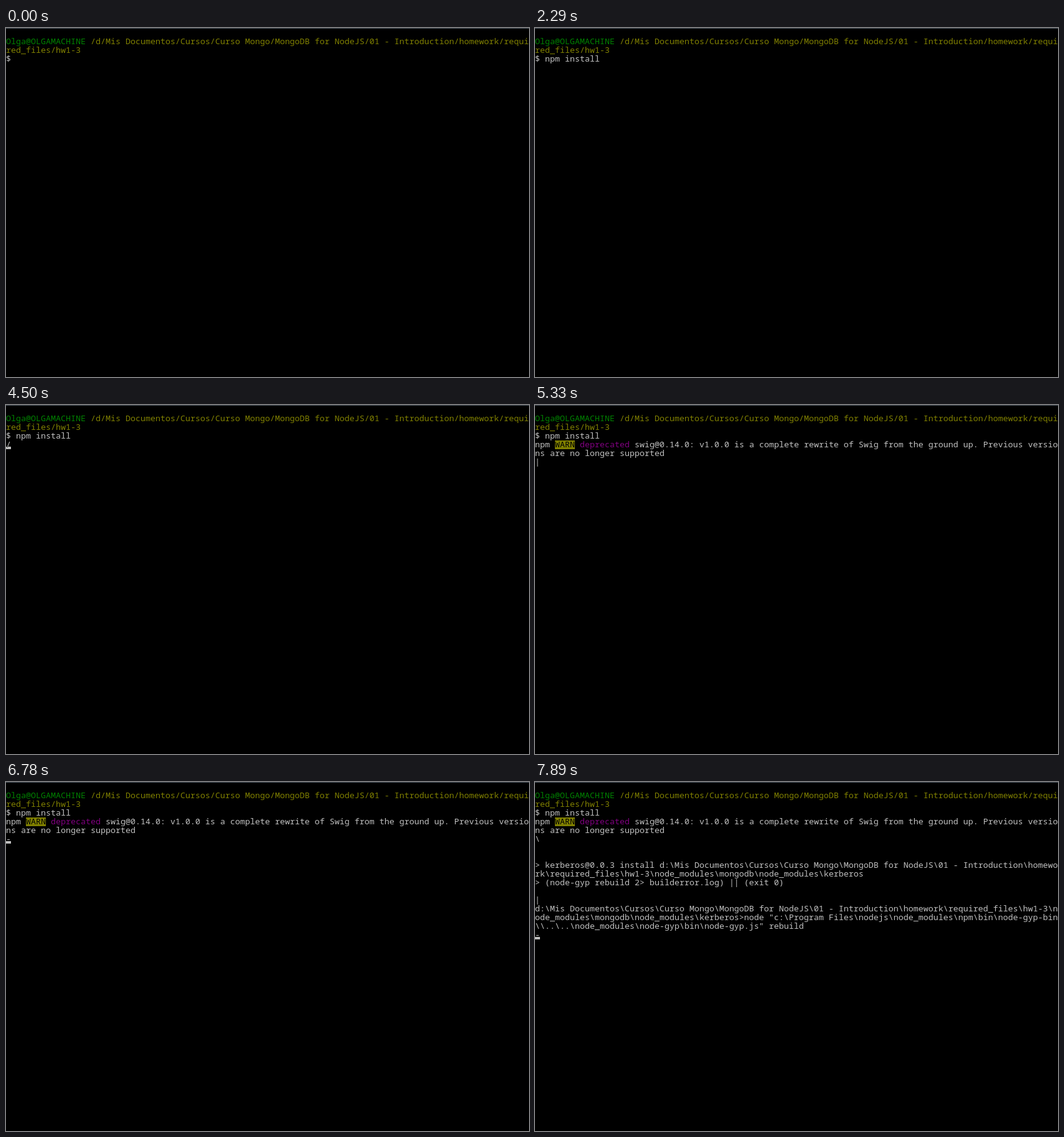
Write an HTML page that moves like this. It is 840 by 561 pixels and loops after 8000 ms.

```html
<!DOCTYPE html>
<html lang="en">
<head>
<meta charset="utf-8">
<title>Terminal</title>
<style>
  html, body { margin: 0; width: 100%; height: 100%; overflow: hidden; background: #000; }
  #screen {
    position: relative; width: 840px; height: 561px; overflow: hidden; background: #000;
    color: #c0c0c0; font: 13.3333px/14px "Noto Sans Mono", "DejaVu Sans Mono", monospace;
    font-variant-ligatures: none; isolation: isolate;
  }
  #edge { position: absolute; left: 0; top: 0; width: 840px; height: 1px; background: #46505a; }
  .run { position: absolute; white-space: pre; height: 14px; }
  #badge { position: absolute; left: 32px; top: 57px; width: 32px; height: 14px; background: #808000; }
  #cursor { position: absolute; width: 8px; height: 4px; background: #c0c0c0; mix-blend-mode: difference; }
</style>
</head>
<body>
<div id="screen"><div id="edge"></div></div>
<script>
const LOOP = 8000, COLS = 105, CW = 8, RH = 14;
const GREEN = '#008000', OLIVE = '#808000', PURPLE = '#800080', GRAY = '#c0c0c0';
const screen = document.getElementById('screen');

function add(parent, id) {
  const el = document.createElement('div');
  if (id) el.id = id;
  return parent.appendChild(el);
}

// Places text on the character grid, wrapping at the last column.
function print(parent, row, col, text, color = GRAY) {
  while (text) {
    const el = add(parent);
    el.className = 'run';
    el.style.cssText = `left:${col * CW}px;top:${row * RH}px;color:${color}`;
    el.textContent = text.slice(0, COLS - col);
    text = text.slice(COLS - col);
    row++;
    col = 0;
  }
}

const user = 'Olga@OLGAMACHINE';
const path = String.raw`d:\Mis Documentos\Cursos\Curso Mongo\MongoDB for NodeJS\01 - Introduction\homework\required_files\hw1-3`;
const module = String.raw`\node_modules\mongodb\node_modules\kerberos`;

print(screen, 1, 0, user, GREEN);
print(screen, 1, user.length + 1, '/' + path.replace(':', '').replaceAll('\\', '/'), OLIVE);
print(screen, 3, 0, '$');

// Output blocks, each visible from its stage onwards.
const warn = add(screen);
add(warn, 'badge');
print(warn, 4, 0, 'npm');
print(warn, 4, 4, 'WARN', '#000');
print(warn, 4, 9, 'deprecated', PURPLE);
print(warn, 4, 20, 'swig@0.14.0: v1.0.0 is a complete rewrite of Swig from the ground up. Previous versions are no longer supported');

const install = add(screen);
print(install, 6, 0, '\\');
print(install, 9, 0, '> kerberos@0.0.3 install ' + path + module);
print(install, 11, 0, '> (node-gyp rebuild 2> builderror.log) || (exit 0)');

const rebuild = add(screen);
print(rebuild, 13, 0, '|');
print(rebuild, 14, 0, path + module + String.raw`>node "c:\Program Files\nodejs\node_modules\npm\bin\node-gyp-bin\\..\..\node_modules\node-gyp\bin\node-gyp.js" rebuild`);

const blocks = [[warn, 2], [install, 3], [rebuild, 4]];
const spinRow = [3, 4, 6, 13, 17];

const typed = add(screen);
const spin = add(screen);
typed.className = spin.className = 'run';
typed.style.left = 2 * CW + 'px';
typed.style.top = 3 * RH + 'px';
const cursor = add(screen, 'cursor');

// time, stage, typed command or spinner glyph, cursor shown
const steps = [
  [0, 0, '', 0], [120, 0, '', 1], [370, 0, 'n', 1], [470, 0, 'np', 1], [710, 0, 'npm', 0],
  [1090, 0, 'npm ', 1], [1210, 0, 'npm i', 1], [1320, 0, 'npm in', 1], [1450, 0, 'npm ins', 1],
  [1680, 0, 'npm inst', 0], [1800, 0, 'npm insta', 1], [1930, 0, 'npm instal', 1],
  [2050, 0, 'npm install', 1], [2170, 1, '', 1], [2290, 1, '', 0], [2770, 1, '', 1], [3280, 1, '', 0],
  [3770, 1, '\\', 1], [3890, 1, '|', 1], [4010, 1, '/', 1], [4140, 1, '-', 1], [4260, 1, '\\', 1],
  [4380, 1, '|', 1], [4500, 1, '/', 1], [4610, 1, '-', 1], [4730, 1, '\\', 1],
  [4850, 2, '', 1], [4960, 2, '|', 1], [5330, 2, '|', 0], [5580, 2, '/', 1], [5700, 2, '-', 1],
  [5820, 2, '-', 0], [5950, 2, '\\', 1], [6070, 2, '|', 1], [6190, 2, '/', 1], [6310, 2, '-', 1],
  [6420, 2, '\\', 1], [6540, 2, '|', 1], [6660, 2, '/', 1], [6780, 2, '-', 1],
  [6910, 3, '', 1], [7040, 4, '/', 1], [7400, 4, '/', 0], [7890, 4, '-', 1]
];

let last;
function render(t) {
  const step = steps.findLast(s => s[0] <= t);
  if (step === last) return;
  last = step;
  const [, stage, text, on] = step;
  const row = spinRow[stage];
  typed.textContent = stage ? 'npm install' : text;
  spin.textContent = stage ? text : '';
  spin.style.top = row * RH + 'px';
  for (const [el, from] of blocks) el.style.display = stage >= from ? '' : 'none';
  cursor.style.left = (stage ? 0 : 2 + text.length) * CW + 'px';
  cursor.style.top = row * RH + 11 + 'px';
  cursor.style.visibility = on ? 'visible' : 'hidden';
}

const start = performance.now();
function tick() {
  render((performance.now() - start) % LOOP);
  requestAnimationFrame(tick);
}
tick();
</script>
</body>
</html>
```
